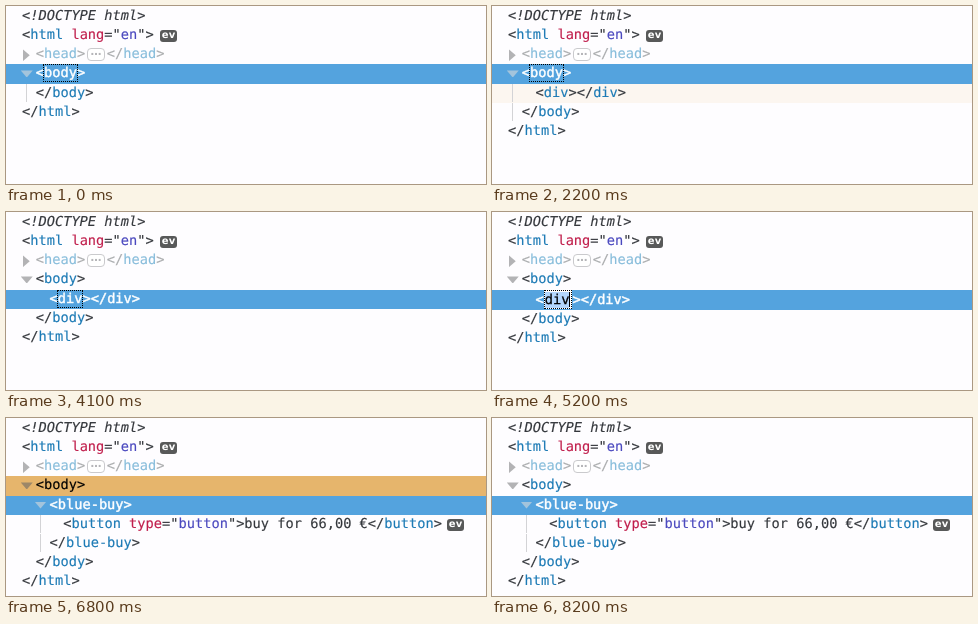
Recreate the animation shown at these times as an HTML page. Size 480 by 178 pixels, loop 8.3 s.

```html
<!DOCTYPE html>
<html lang="en">
<meta charset="utf-8">
<title>Inspector</title>
<style>
html, body { margin: 0; width: 100%; height: 100%; overflow: hidden; background: #fefdff; }
#tree {
  padding-top: 1px; color: #34373c; text-rendering: geometricPrecision;
  font: 13.68px/19.15px "DejaVu Sans Mono", monospace; -webkit-text-stroke: .15px;
}
.row { position: relative; height: 19.15px; white-space: pre; }
.row.edit { height: 20.1px; line-height: 20.1px; }
.row b { font-weight: normal; color: #1c7ab5; }
.row u { text-decoration: none; color: #c01e4c; }
.row s { text-decoration: none; color: #4b49bf; }
.row.sel, .row.sel b { color: #fff; }
.row.sel { background: #54a3de; -webkit-text-stroke: .45px; }
.row.lit, .row.lit * { color: #000; }
.row.dim { color: #aaacae; }
.row.dim b { color: #88bddb; }
.row .focus { outline: 1px dotted #000; }
.row .field {
  display: inline-block; box-sizing: border-box; height: 19px; line-height: 19px; padding: 0 2px 0 1px;
  vertical-align: top; background: #fff; color: #000; border: 1px dotted #000; border-width: 1px 0;
  outline: 1px dotted #000; outline-offset: -1px; -webkit-text-stroke: .25px;
}
.field mark { background: #b3d7fe; color: #000; }
.caret { display: inline-block; width: 1px; height: 15px; margin-top: 1px; vertical-align: top; background: #000; }
.ev, .dots {
  position: absolute; box-sizing: border-box; border-radius: 3px; text-align: center; -webkit-text-stroke: 0;
}
.ev { top: 4px; width: 17px; height: 12px; background: #585959; color: #fff; font: bold 10px/11.5px "DejaVu Sans", sans-serif; }
.dots {
  top: 3px; left: 81px; width: 18px; height: 13px; background: #fff; color: #b4b4b8;
  border: 1px solid #cacacd; border-radius: 4px; font: bold 11px/6px "DejaVu Sans", sans-serif;
}
.arrow { position: absolute; top: 6px; width: 12px; height: 7px; background: #b3b3b5; clip-path: polygon(0 0, 100% 0, 50% 100%); }
.sel .arrow { background: #a3c4dc; }
.warm .arrow { background: #9d8768; }
.arrow.closed { top: 4px; width: 7px; height: 12px; margin-left: 2px; clip-path: polygon(0 0, 100% 50%, 0 100%); }
.guide { position: absolute; top: 0; width: 1px; height: 18px; background: #d3d3d6; }
</style>
<div id="tree"></div>
<script>
const LOOP = 8300, ADD = 1390, SELECT = 2500, EDIT = 5000, TYPE = 5400, KEY = 160, COMMIT = 6790;
const tree = document.getElementById('tree');

// CSS "ease" curve
function ease(p) {
  let lo = 0, hi = 1, s;
  const curve = (a, b) => 3 * (1 - s) ** 2 * s * a + 3 * (1 - s) * s * s * b + s ** 3;
  for (let i = 0; i < 16; i++) {
    s = (lo + hi) / 2;
    if (curve(.25, .25) < p) lo = s; else hi = s;
  }
  return curve(.1, 1);
}

// Highlight strength: solid for half a second, then fading out
function flash(age) {
  if (age < 0 || age >= 1000) return 0;
  return age < 500 ? 1 : 1 - ease((age - 500) / 500);
}

const left = depth => 16 + depth * 13.75;
const open = (name, attrs = '') => `&lt;<b>${name}</b>${attrs}&gt;`;
const close = name => `&lt;/<b>${name}</b>&gt;`;
const attr = (key, value) => ` <u>${key}</u>="<s>${value}</s>"`;
const focus = name => `<span class="focus">${name}</span>`;
const badge = x => `<span class="ev" style="left:${x}px">ev</span>`;
const arrow = (depth, cls = '') => `<i class="arrow ${cls}" style="left:${left(depth) - 15}px"></i>`;
const guide = depth => `<i class="guide" style="left:${left(depth) - 10}px"></i>`;

function row(depth, html, cls = '', glow = 0) {
  if (glow) cls += glow === 1 ? ' lit warm' : ' warm';
  const background = glow ? `;background:rgba(230,181,108,${glow.toFixed(3)})` : '';
  return `<div class="row ${cls}" style="padding-left:${left(depth)}px${background}">${html}</div>`;
}

function divRow(t) {
  if (t < SELECT) return row(2, guide(1) + open('div') + close('div'), '', flash(t - ADD));
  if (t < EDIT) return row(2, open(focus('div')) + close('div'), 'sel');
  const typed = 'blue-buy'.slice(0, Math.max(0, Math.floor((t - TYPE) / KEY) + 1));
  const field = `<span class="field">${typed || '<mark>div</mark>'}<i class="caret"></i></span>`;
  return row(2, `&lt;${field}&gt;` + close('div'), 'sel edit');
}

function view(t) {
  const bodySelected = t < SELECT, done = t >= COMMIT;
  const rows = [
    row(0, '<em>&lt;!DOCTYPE html&gt;</em>'),
    row(0, open('html', attr('lang', 'en')) + badge(154)),
    row(1, arrow(1, 'closed') + open('head') +
      '<span class="dots">…</span><span style="margin-left:21.6px">' + close('head') + '</span>', 'dim'),
    row(1, arrow(1) + open(bodySelected ? focus('body') : 'body'), bodySelected ? 'sel' : '', flash(t - COMMIT))
  ];
  if (done) {
    rows.push(
      row(2, arrow(2) + open('blue-buy'), 'sel'),
      row(3, guide(2) + open('button', attr('type', 'button')) + 'buy for 66,00 €' + close('button') + badge(441)),
      row(2, guide(2) + close('blue-buy')));
  } else if (t >= ADD) {
    rows.push(divRow(t));
  }
  rows.push(row(1, (bodySelected ? guide(1) : '') + close('body')), row(0, close('html')));
  return rows.join('');
}

let shown;
function frame() {
  const html = view(performance.now() % LOOP);
  if (html !== shown) tree.innerHTML = shown = html;
  requestAnimationFrame(frame);
}
frame();
</script>
</html>
```
